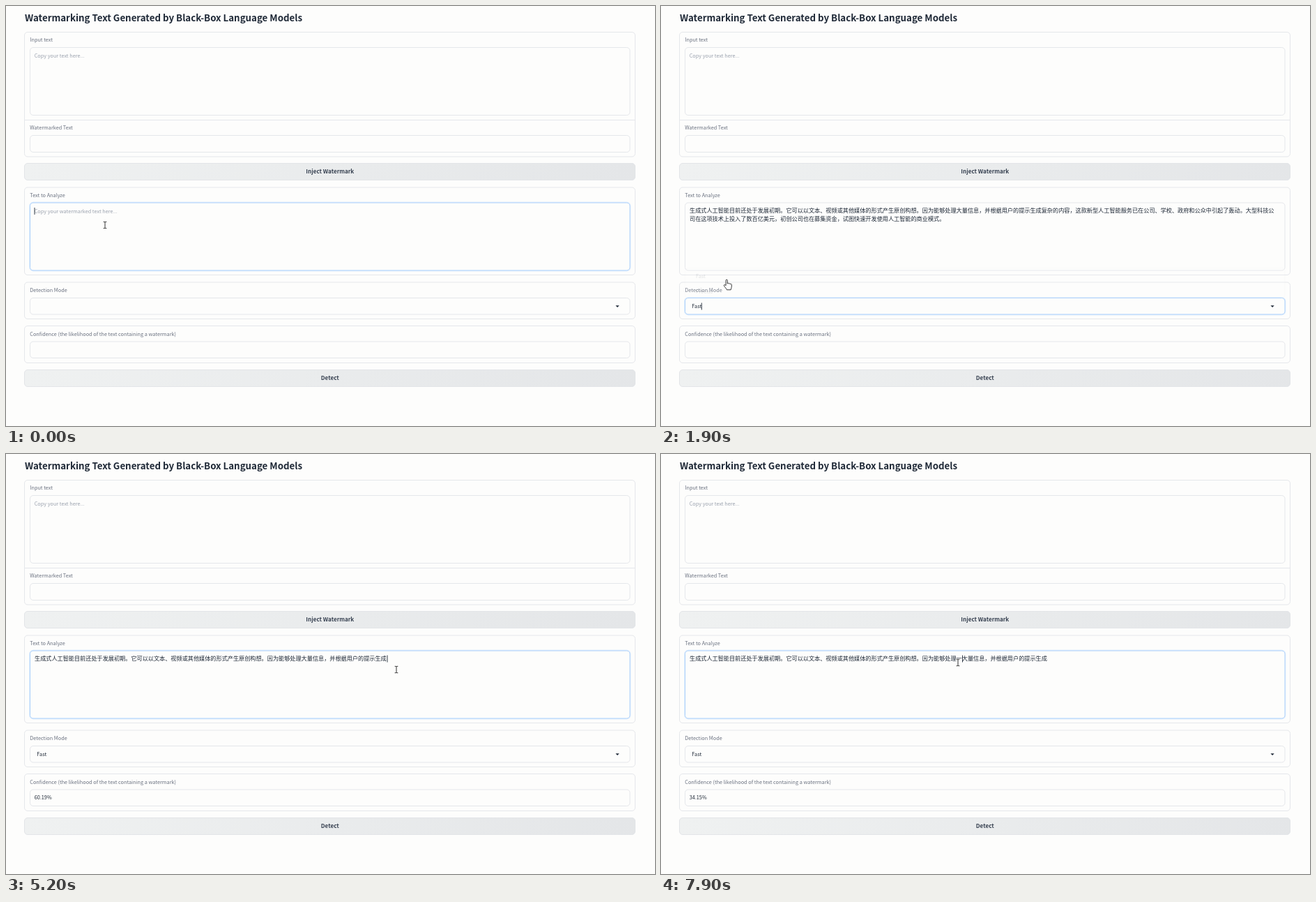
An HTML page that plays this animation: 931 by 602 pixels, repeating every 8000 ms.

```html
<!DOCTYPE html>
<html lang="zh-CN">
<head>
<meta charset="utf-8">
<title>Watermark demo</title>
<style>
html, body { margin: 0; width: 100%; height: 100%; overflow: hidden; background: #fdfdfc; }
svg { display: block; width: 931px; height: 602px; }
text {
  font: 7.3px "Noto Sans CJK SC", "Noto Sans CJK", "Noto Sans CJK JP", "Open Sans", sans-serif;
  fill: #1f2937; white-space: pre; text-spacing-trim: space-all;
}
.title { font-size: 13.3px; font-weight: 600; }
.label text { fill: #6b7280; }
.hint { fill: #9ca3af; }
.btn { font-size: 8.1px; font-weight: 600; fill: #374151; text-anchor: middle; }
.body text { font-size: 8.155px; }
.timer { font: 7.08px "Noto Sans Mono", monospace; fill: #4b5563; text-anchor: end; }
.box { fill: #fdfdfc; stroke: #e5e7eb; }
.ring { fill: none; stroke: #e6f1fd; stroke-width: 3; visibility: hidden; }
.focus .ring { visibility: visible; }
.focus .box { stroke: #a9cffb; }
.face { fill: url(#shade); stroke: #e3e5e8; }
.hover { fill: #f0f2f1; }
.sel { fill: #fff; }
#marks { fill: #0078d7; }
#pointer path { fill: #fff; stroke: #222; stroke-width: .9; stroke-linejoin: round; }
#pointer #beam { fill: none; stroke: #333; stroke-width: 1; }
</style>
</head>
<body>
<svg viewBox="0 0 931 602">
  <defs>
    <linearGradient id="shade">
      <stop stop-color="#eff1f1"/><stop offset="1" stop-color="#e4e6e8"/>
    </linearGradient>
  </defs>

  <text class="title" x="27" y="22">Watermarking Text Generated by Black-Box Language Models</text>

  <g class="box">
    <rect x="26.5" y="37.5" width="876" height="178.5" rx="4.5"/>
    <path d="M27 163.5H902"/>
    <rect x="34.5" y="59.5" width="860.5" height="97" rx="4.5"/>
    <rect x="34.5" y="185.5" width="860.5" height="24" rx="4.5"/>
    <rect x="26.5" y="260" width="876" height="125.5" rx="4.5"/>
    <rect x="26.5" y="396" width="876" height="52.5" rx="4.5"/>
    <rect x="26.5" y="458.5" width="876" height="53" rx="4.5"/>
  </g>
  <g class="label">
    <text x="34.3" y="51.2">Input text</text>
    <text x="34.3" y="177.4">Watermarked Text</text>
    <text x="34.3" y="273.8">Text to Analyze</text>
    <text x="34.3" y="410.4">Detection Mode</text>
  </g>
  <text class="hint" x="40.7" y="74">Copy your text here...</text>

  <rect class="face" x="26.5" y="225.5" width="876" height="24" rx="4.5"/>
  <text class="btn" x="464.8" y="240.2">Inject Watermark</text>

  <g id="area">
    <rect class="ring" x="34.5" y="282" width="860.5" height="97" rx="4.5"/>
    <rect class="box" x="34.5" y="282" width="860.5" height="97" rx="4.5"/>
  </g>
  <text id="hint" class="hint" x="40.7" y="296.5">Copy your watermarked text here...</text>
  <g id="marks">
    <rect x="546.6" y="287.5" width="334.4" height="12"/>
    <rect x="41" y="299.5" width="367" height="12"/>
  </g>
  <g class="body">
    <text x="41" y="296.4"><tspan id="head"></tspan><tspan id="tail"></tspan></text>
    <text id="second" x="41" y="308.4"></text>
  </g>

  <g id="mode">
    <rect class="ring" x="34.5" y="418.5" width="860.5" height="23.5" rx="4.5"/>
    <rect class="box" x="34.5" y="418.5" width="860.5" height="23.5" rx="4.5"/>
    <path d="M874.5 429.3h5.2l-2.6 2.7z" fill="#1f2937"/>
    <text id="choice" x="44.3" y="433.2">Fast</text>
  </g>

  <g id="result">
    <g class="label"><text x="34.3" y="473.2">Confidence (the likelihood of the text containing a watermark)</text></g>
    <rect class="box" x="34.5" y="481" width="860.5" height="23.5" rx="4.5"/>
    <text id="score" x="40.7" y="495.4"></text>
  </g>
  <g id="busy">
    <circle cx="464" cy="484" r="4.5" fill="#ec7440"/>
    <text id="timer" class="timer" x="898" y="468"></text>
  </g>

  <rect id="detect" class="face" x="26.5" y="521.5" width="876" height="24" rx="4.5"/>
  <text class="btn" x="464.8" y="536.2">Detect</text>

  <g id="list">
    <rect class="box" x="34.5" y="372.5" width="860.5" height="43.5" rx="4.5"/>
    <rect id="lit" x="35" y="373" width="859.5" height="21.5" rx="4" fill="#f1f3f4"/>
    <text x="50" y="387">Fast</text>
    <text x="50" y="408.6">Precise</text>
  </g>

  <path id="caret" d="M0 0v10" stroke="#1f2937" stroke-width=".9"/>
  <g id="pointer">
    <path id="beam" d="M-2.3-4.7H-.8L0-4.2.8-4.7H2.3M0-4.2V4.2M-2.3 4.7H-.8L0 4.2.8 4.7H2.3"/>
    <path id="arrow" d="M0 0V10.3L2.4 8.2 4 12 5.7 11.3 4.1 7.6H7.3Z"/>
    <path id="hand" d="M-.9 8.6V1.3a1.1 1.1 0 0 1 2.2 0V5.9c.3-.9 2-.8 2.2.3.4-.8 2-.6 2.1.5.6-.6 1.7-.3 1.7.8V10.2c0 2-1 2.8-1.2 4.6H.4C0 13-2.8 10.8-3.6 8.8c-.5-1.1.9-1.8 1.6-.9Z"/>
  </g>
</svg>
<script>
const $ = id => document.getElementById(id);
const LOOP = 8000, STEP = 100;

const KEPT = '生成式人工智能目前还处于发展初期。它可以以文本、视频或其他媒体的形式产生原创构想。因为能够处理大量信息，并根据用户的提示生成';
const TAIL = '复杂的内容，这款新型人工智能服务已在公司、学校、政府和公众中引起了轰动。大型科技公';
const SECOND = '司在这项技术上投入了数百亿美元，初创公司也在募集资金，试图快速开发使用人工智能的商业模式。';
const EDITED = KEPT.replace('处理', '处理一');

// Pointer path: time, x, y
const PATH = [
  [0, 142, 314], [300, 142, 314], [900, 133.5, 418], [1100, 133, 428], [1200, 133, 428],
  [1700, 94, 392], [1900, 94, 392], [2400, 133, 526], [3800, 133, 526], [4300, 506, 318],
  [4400, 506, 318], [4700, 548, 295], [4900, 560, 309], [5200, 560, 309],
  [5600, 293, 531.5], [5900, 293, 531.5], [6500, 426, 299], [LOOP, 426, 299]
];
// Visible caret: from, to, x, top
const CARETS = [
  [0, 300, 41, 289], [300, 800, 408.5, 300.5], [1200, 1700, 44.5, 425.5], [1900, 2300, 58.3, 425.5],
  [4200, 4700, 408.5, 300.5], [5200, 5600, 547, 288.5], [7000, 7600, 424.5, 288.5], [7700, LOOP, 432.5, 288.5]
];
// Detection runs: from, to
const RUNS = [[2400, 3500], [5800, 6700]];

const within = (t, ...spans) => spans.find(([a, b]) => t >= a && t < b);
const show = (id, on) => $(id).style.visibility = on ? 'visible' : 'hidden';
const place = (id, x, y) => $(id).setAttribute('transform', `translate(${x} ${y})`);

function put(id, text) {
  if ($(id).textContent !== text) $(id).textContent = text;
}

function pointerAt(t) {
  const i = PATH.findIndex(p => p[0] > t);
  const [t0, x0, y0] = PATH[i - 1], [t1, x1, y1] = PATH[i];
  const u = (t - t0) / (t1 - t0), e = u * u * (3 - 2 * u);
  return [x0 + (x1 - x0) * e, y0 + (y1 - y0) * e];
}

function draw(t) {
  const [x, y] = pointerAt(t);
  const listed = within(t, [1200, 2000]);
  const onList = listed && y > 372 && y < 416;
  const onDetect = y > 521 && y < 546;
  const onField = (y > 282 && y < 379) || (y > 418.5 && y < 442);
  const kind = onList || onDetect ? 'hand' : onField ? 'beam' : 'arrow';
  for (const k of ['hand', 'beam', 'arrow']) show(k, k === kind);
  place('pointer', x, y);

  const caret = within(t, ...CARETS);
  show('caret', caret);
  if (caret) place('caret', caret[2], caret[3]);

  const whole = within(t, [300, 5200]);
  const marked = within(t, [4900, 5200]);
  put('head', t < 300 ? '' : t < 7700 ? KEPT : EDITED);
  put('tail', whole ? TAIL : '');
  put('second', whole ? SECOND : '');
  show('hint', t < 300);
  show('marks', marked);
  for (const id of ['tail', 'second']) $(id).classList.toggle('sel', !!marked);

  $('area').classList.toggle('focus', !!within(t, [0, 1100], [4200, 5700], [7000, LOOP]));
  $('mode').classList.toggle('focus', !!within(t, [1100, 2400]));
  show('choice', t >= 1800);

  const closing = t >= 1900;
  show('list', listed);
  show('lit', listed && y < 394 && !closing);
  $('list').style.opacity = closing ? .12 : t < 1300 ? .6 : 1;
  place('list', 0, closing ? 3 : 0);

  const run = within(t, ...RUNS);
  show('busy', run);
  show('result', !run);
  if (run) put('timer', ((t - run[0]) / 1000).toFixed(1) + 's');
  put('score', t < 3500 ? '' : t < 6700 ? '60.19%' : '34.15%');
  $('detect').setAttribute('class', onDetect ? 'face hover' : 'face');
}

const start = performance.now();
function tick() {
  const t = (performance.now() - start) % LOOP;
  draw(Math.floor(t / STEP) * STEP);
  requestAnimationFrame(tick);
}
tick();
</script>
</body>
</html>
```
